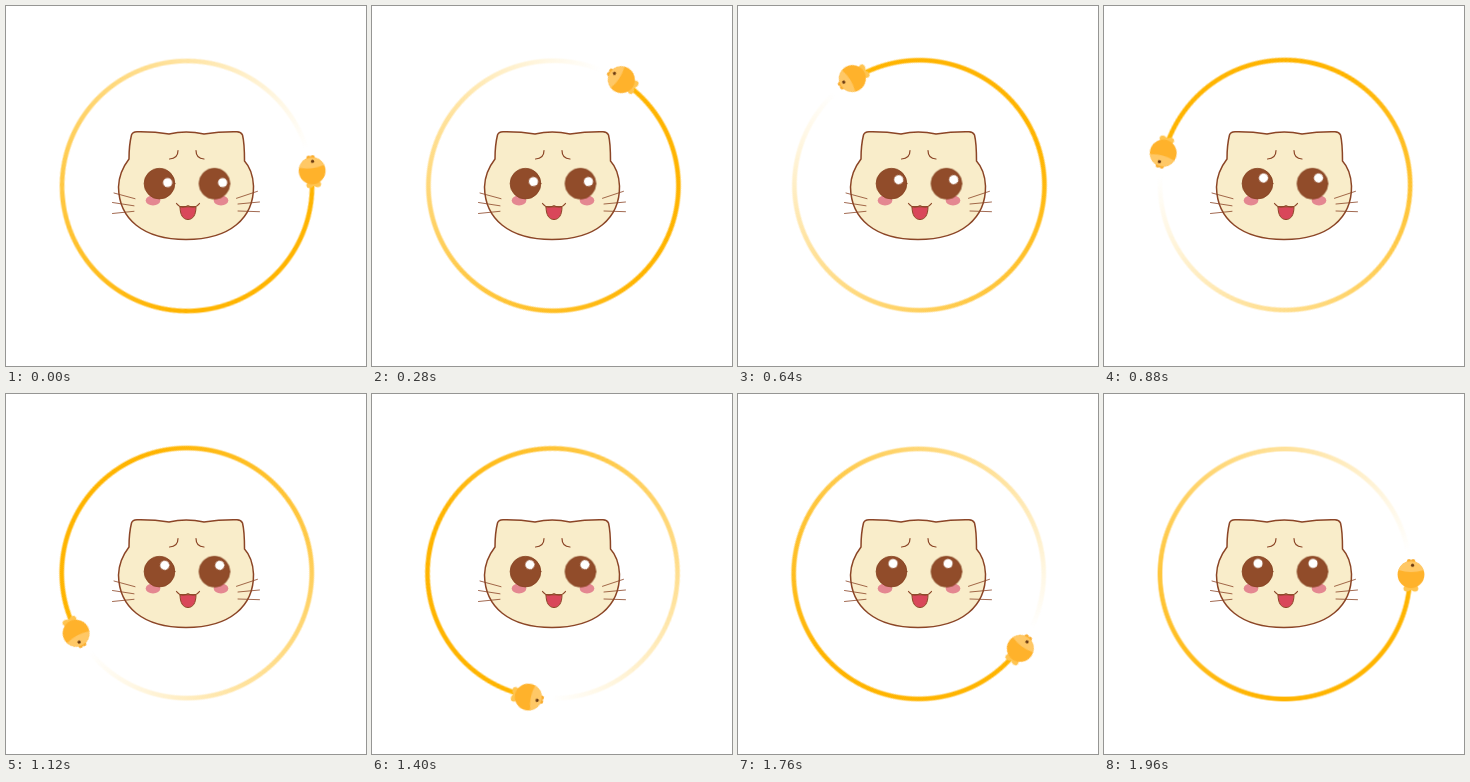
Animation, 360 px wide and 360 px high, one loop 2000 ms. Source, as an HTML page:

```html
<!DOCTYPE html>
<html lang="en">
<head>
<meta charset="utf-8">
<title>Cat watching a fish</title>
<style>
  html, body { margin: 0; width: 100%; height: 100%; overflow: hidden; background: #fff; }
  .stage { position: relative; width: 360px; height: 360px; overflow: hidden; }
  svg { position: absolute; left: 0; top: 0; width: 360px; height: 360px; }

  .orbit {
    position: absolute; inset: 0;
    transform-origin: 181px 179.5px;
    animation: orbit 2s steps(50) infinite;
  }
  /* Trail: solid behind the fish, fading out clockwise */
  .trail {
    position: absolute; left: 51.4px; top: 49.5px; width: 260px; height: 260px;
    background: conic-gradient(from 90deg,
      #ffb400 0deg 105deg, rgba(255, 180, 0, .72) 190deg, rgba(255, 180, 0, .36) 277deg,
      rgba(255, 180, 0, .1) 325deg, rgba(255, 180, 0, 0) 349deg 354deg, #ffb400 358deg);
    -webkit-mask: var(--ring); mask: var(--ring);
    --ring: radial-gradient(circle, transparent 121.9px, #000 123.5px 126.5px, transparent 128.1px);
  }
  .glint { animation: spin 2s steps(50) infinite; }
  .lid { animation: lid 2s linear infinite; }

  @keyframes orbit {
    from { transform: rotate(-6.7deg); }
    to { transform: rotate(-366.7deg); }
  }
  @keyframes spin {
    from { transform: rotate(0deg); }
    to { transform: rotate(-360deg); }
  }
  @keyframes lid {
    0% { transform: translateY(0); }
    50% { transform: translateY(0); animation-timing-function: steps(10); }
    70% { transform: translateY(11.8px); }
    74% { transform: translateY(11.8px); animation-timing-function: steps(11); }
    96%, 100% { transform: translateY(0); }
  }
</style>
</head>
<body>
<div class="stage">
  <svg viewBox="0 0 360 360" fill="none" stroke="#8b4526" stroke-linecap="round">
    <defs>
      <g id="eye" stroke="none">
        <circle r="15.4" fill="#914c2a" stroke="#84401f" stroke-width=".7"/>
        <g class="glint"><circle cx="8.2" r="4.6" fill="#fff"/></g>
        <rect class="lid" x="-17" y="-31" width="34" height="14.8" fill="#f9edca"/>
      </g>
    </defs>

    <path fill="#f9edca" stroke-width="1.5" d="M123 153C123 143 123.5 137 125.5 129Q126.500 126 131 125.800Q148 125.500 163 128
      Q180 124 198 128Q214 125.500 231 125.800Q235 126 236.500 129C238.500 137 238.500 143 238.500 155
      C245 162 247 170 247.500 180C248 212 224 233.500 180 233.500C137 233.500 113 213 112.500 181C112.800 171 116 162 123 153Z"/>

    <g fill="#e48791" stroke="none">
      <ellipse cx="147" cy="194.500" rx="7.300" ry="5"/>
      <ellipse cx="215" cy="194.500" rx="7.300" ry="5"/>
    </g>
    <use href="#eye" x="153.500" y="177.600"/>
    <use href="#eye" x="208.500" y="177.600"/>

    <path stroke-width="1.200" d="M172 144.500Q172 152.500 163.500 153M190 144.500Q190 152.500 198 153"/>
    <path fill="#d9475a" stroke-width="1" d="M174 200.800H190C190 209 187 213.500 182 213.500S174 209 174 200.800Z"/>
    <path stroke-width="1.200" d="M170.500 197.500Q173 201 177 200.800Q180.500 200.800 182 199.800Q183.500 200.800 187 200.800Q191 201 193.500 197.500"/>
    <path stroke-width=".8" d="M108 187L129 192.700M106.500 196.500L128 199.800M106.500 207.500L128 205.300
      M251.500 185.300L230.500 192.300M253.500 196L232 198M253.500 205.700L232 205"/>
  </svg>

  <div class="orbit">
    <div class="trail"></div>
    <svg viewBox="0 0 360 360">
      <!-- Fish, drawn facing right -->
      <g transform="translate(307 179.5) rotate(-90)">
        <g fill="#ffc450">
          <ellipse cx="-14" cy="-4" rx="3" ry="3.400"/>
          <ellipse cx="-14" cy="4" rx="3" ry="3.400"/>
          <rect x="-15.500" y="-4" width="5" height="8"/>
        </g>
        <g fill="#f9ab2c">
          <circle cx="13.300" cy="-2" r="2.200"/>
          <circle cx="13.300" cy="2" r="2.200"/>
        </g>
        <circle r="13.400" fill="#ffb22b"/>
        <path fill="#ffc866" d="M4.500 -12.600A13.400 13.400 0 0 1 4.500 12.600Q.5 0 4.500 -12.600Z"/>
        <circle cx="9.300" cy="1.500" r="1.600" fill="#6b3a12"/>
      </g>
    </svg>
  </div>
</div>
</body>
</html>
```
